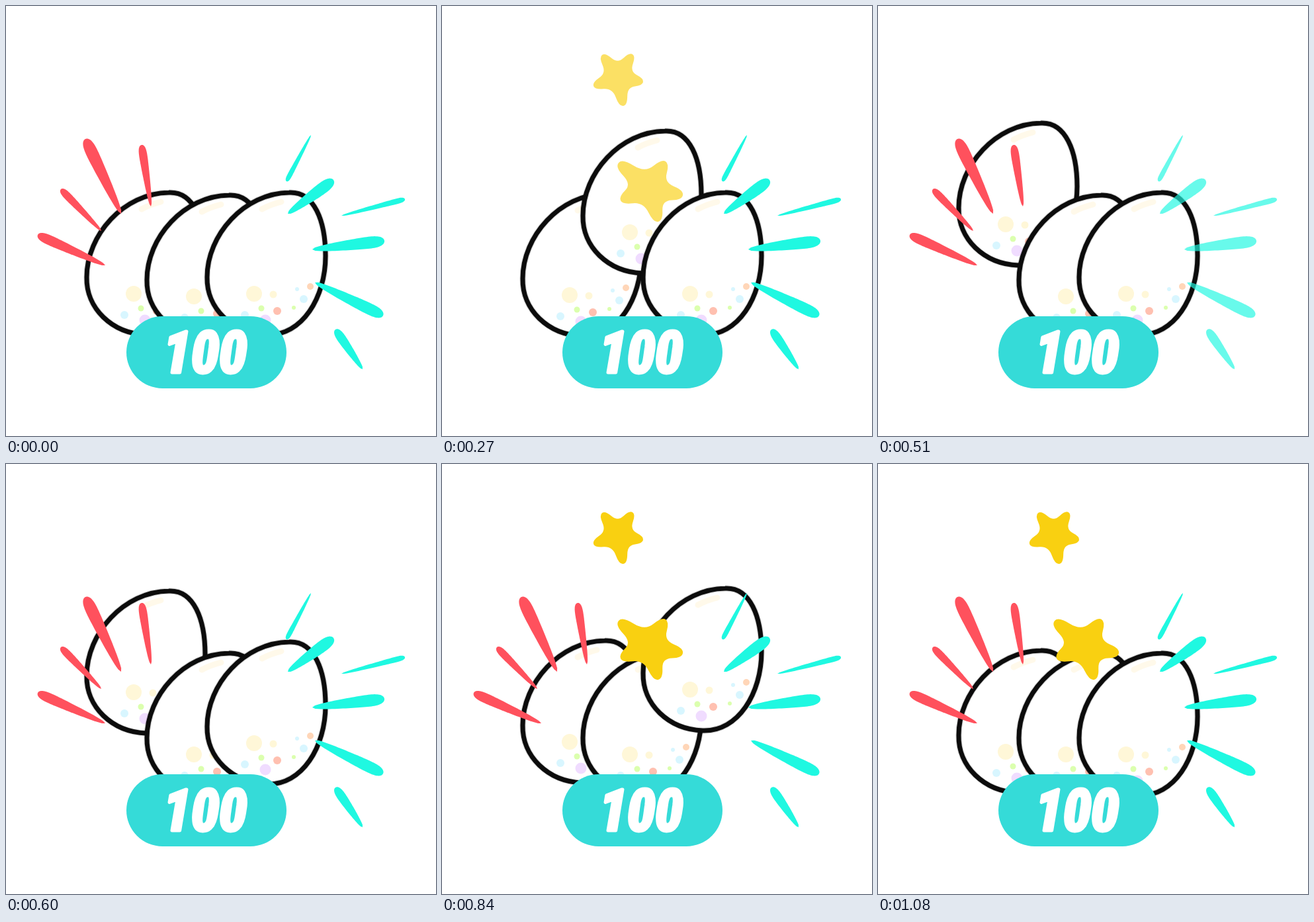
Write an HTML page with a canvas that moves like this. It is 650x650 px and loops after 1510 ms.

```html
<!DOCTYPE html>
<html lang="en">
<head>
<meta charset="utf-8">
<title>Bouncing eggs</title>
<style>
html, body { margin: 0; width: 100%; height: 100%; overflow: hidden; background: #fff; }
canvas { display: block; width: 650px; height: 650px; }
</style>
</head>
<body>
<canvas id="stage" width="650" height="650"></canvas>
<script>
const ctx = document.getElementById('stage').getContext('2d');
const LOOP = 1510, STEP = 30, LAST = 36, SPAN = 6;

// Rise in pixels at each key pose, SPAN steps apart; the last value holds
const RISE = {
  left: [0, 0, -4, 127, 15, 15, 0],
  middle: [-4, 190, -4],
  right: [0, 0, 0, 0, 39, 121, -4]
};

// Brush stroke from a thin tip to a round end, w is its half width
function ray([tipX, tipY, endX, endY, w]) {
  const path = new Path2D(), n = 40;
  const dx = endX - tipX, dy = endY - tipY, len = Math.hypot(dx, dy);
  for (let i = 0; i <= 2 * n; i++) {
    const side = i <= n ? 1 : -1;
    const t = Math.sin(Math.PI * i / (2 * n));
    const h = side * w * t ** 0.45 * Math.sqrt(1 - t ** (len / w));
    path.lineTo(tipX + dx * t - dy / len * h, tipY + dy * t + dx / len * h);
  }
  path.closePath();
  return path;
}

// Closed curve through the midpoints of the given points
function blob(points) {
  const at = i => points[i % points.length];
  const mid = i => [(at(i)[0] + at(i + 1)[0]) / 2, (at(i)[1] + at(i + 1)[1]) / 2];
  const path = new Path2D();
  path.moveTo(...mid(0));
  for (let i = 1; i <= points.length; i++) path.quadraticCurveTo(...at(i), ...mid(i));
  path.closePath();
  return path;
}

// Rounded star: blunt tips, with the notches pulled in towards the centre
function star(cx, cy, tips) {
  const points = tips.flatMap(([x, y], i) => {
    const [nx, ny] = tips[(i + 1) % tips.length];
    const dx = (x - cx) * 0.14, dy = (y - cy) * 0.14;
    const notch = [cx + ((x + nx) / 2 - cx) * 0.6, cy + ((y + ny) / 2 - cy) * 0.6];
    return [[x + dy, y - dx], [x - dy, y + dx], notch];
  });
  return blob(points);
}

const redRays = [
  [174, 314, 120, 201, 10.5],
  [144, 340, 83, 277, 6.5],
  [150, 392, 48, 346, 8.5],
  [219, 303, 205, 210, 7]
].map(ray);

const cyanRays = [
  [461, 195, 424, 265, 4],
  [426, 314, 495, 263, 10.5],
  [507, 317, 603, 292, 4.5],
  [463, 368, 572, 355, 10.5],
  [467, 418, 570, 468, 10],
  [539, 549, 498, 489, 8]
].map(ray);

const stars = [
  star(267, 107, [[242, 74], [288, 73], [304, 115], [274, 151], [229, 121]]),
  star(313, 276, [[267, 237], [338, 235], [364, 286], [327, 326], [270, 294]])
];

const shell = new Path2D('M428 282C466 280 483 325 483 378C483 440 448 499 394 497' +
  'C342 495 303 457 304 410C304 346 360 283 428 282Z');

const cream = '#fff7d8', sky = '#d8f6ff', lime = '#dbffae', peach = '#ffd6b8';
const spots = [
  [375, 435, 12, cream], [404, 436, 5.5, cream],
  [386, 457, 4.5, lime], [435, 456, 3, lime],
  [361, 467, 6, sky], [450, 443, 6, sky], [440, 428, 3, sky],
  [410, 461, 6, '#ffc0b0'], [460, 424, 5, peach], [392, 475, 8.5, '#f0dcff']
];

function stroke(path, color, width) {
  ctx.strokeStyle = color;
  ctx.lineWidth = width;
  ctx.stroke(path);
}

function egg(dx, dy) {
  ctx.save();
  ctx.translate(dx, dy);
  ctx.fillStyle = '#fff';
  ctx.fill(shell);
  ctx.lineCap = 'round';
  stroke(new Path2D('M387 307Q400 300 416 296'), '#fff9ea', 9);
  for (const [x, y, r, color] of spots) {
    ctx.fillStyle = color;
    ctx.beginPath();
    ctx.arc(x, y, r, 0, Math.PI * 2);
    ctx.fill();
  }
  stroke(shell, 'rgba(0,0,0,.2)', 9);
  stroke(shell, '#0c0c0c', 7);
  ctx.restore();
}

function paint(paths, color, alpha) {
  ctx.globalAlpha = alpha;
  ctx.fillStyle = color;
  paths.forEach(p => ctx.fill(p));
  ctx.globalAlpha = 1;
}

function badge() {
  ctx.fillStyle = '#35dbd8';
  ctx.beginPath();
  ctx.roundRect(182, 469, 242, 109, 54.5);
  ctx.fill();
  ctx.font = 'italic 900 86px "Noto Sans ExtraCondensed", "Roboto Condensed", "Open Sans Condensed", "Open Sans", sans-serif';
  ctx.fontStretch = 'extra-condensed';
  ctx.textAlign = 'center';
  ctx.lineJoin = 'round';
  ctx.lineWidth = 5;
  ctx.fillStyle = ctx.strokeStyle = '#fff';
  ctx.fillText('100', 301, 554);
  ctx.strokeText('100', 301, 554);
}

function rise(keys, step) {
  const pos = Math.min(step / SPAN, keys.length - 1);
  const a = keys[Math.floor(pos)], b = keys[Math.ceil(pos)];
  return Math.round(a + (b - a) * (pos % 1));
}

function starAlpha(step) {
  if (step < 4 || (step >= 15 && step < 21)) return 0;
  return step < 10 ? 0.65 : 1;
}

function draw(step) {
  ctx.fillStyle = '#fff';
  ctx.fillRect(0, 0, 650, 650);
  egg(-182, -rise(RISE.left, step));
  egg(-91, -rise(RISE.middle, step));
  egg(0, -rise(RISE.right, step));
  paint(redRays, '#ff515d', step >= 4 && step < 10 ? 0 : 1);
  paint(cyanRays, '#1ff8e1', step >= 10 && step < 18 ? 0.67 : 1);
  paint(stars, '#f9d011', starAlpha(step));
  badge();
}

function tick() {
  const t = performance.now() % LOOP;
  draw(Math.min(LAST, Math.floor(t / STEP)));
  requestAnimationFrame(tick);
}
tick();
</script>
</body>
</html>
```
